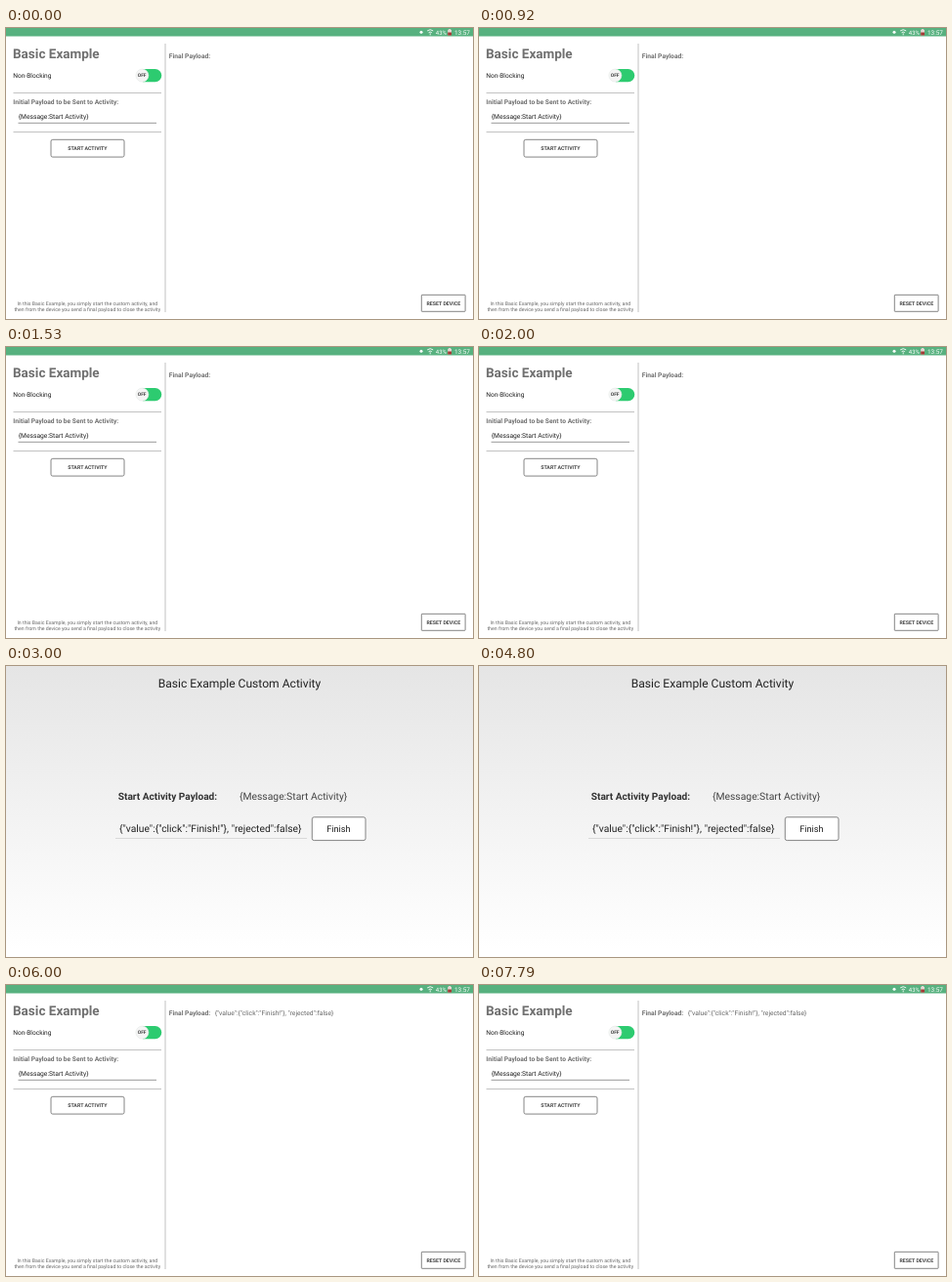
Write an HTML page that moves like this. It is 478x298 px and loops after 8.99 s.

```html
<!DOCTYPE html>
<html lang="en">
<head>
<meta charset="utf-8">
<title>Basic Example</title>
<style>
  html, body { margin: 0; width: 100%; height: 100%; overflow: hidden; background: #fff; }
  svg { display: block; width: 100vw; height: 100vh; }
  text { font-family: Roboto, sans-serif; font-size: 6.72px; fill: #222; white-space: pre; text-rendering: geometricPrecision; }
  .bold { font-weight: 700; fill: #707070; }
  .button { font-weight: 700; font-size: 5.25px; fill: #444; text-anchor: middle; }
  .hint { font-size: 5.2px; fill: #666; text-anchor: middle; }
  .box { fill: #fff; stroke: #666; stroke-width: .8; }
  .rule { stroke: #c2c2c2; fill: none; }
  .status text { fill: #fff; font-size: 6.4px; }
</style>
</head>
<body>
<svg viewBox="0 0 478 298">
  <defs>
    <linearGradient id="fade" x2="0" y2="1">
      <stop stop-color="#e5e5e5"/>
      <stop offset="1" stop-color="#fff"/>
    </linearGradient>
    <clipPath id="page"><path d="M0 0H478V291H0Z"/></clipPath>
  </defs>

  <g id="home" clip-path="url(#page)">
    <g class="status">
      <path d="M0 0H478V8.5H0Z" fill="#57b17f"/>
      <circle cx="425" cy="4.3" r="1.5" fill="#fff"/>
      <path d="M431.2 2.9Q434.2 .5 437.2 2.9M432.6 4.7Q434.2 3.4 435.8 4.7M434.2 5.4V7.3" fill="none" stroke="#fff" stroke-width=".9"/>
      <text x="439.8" y="6.5" style="font-size:6px">43%</text>
      <path d="M452.2 1.8H453.2V1H455V1.8H456V7.6H452.2Z" fill="#e4d8d4"/>
      <path d="M452.2 4.5H456V7.6H452.2Z" fill="#a33a35"/>
      <text x="459" y="7">13:57</text>
    </g>

    <text class="bold" x="7" y="31.3" style="font-size:13.5px">Basic Example</text>
    <text x="7.3" y="51.3" style="font-size:6.6px">Non-Blocking</text>
    <path d="M140 42H152.7A6.6 6.6 0 0 1 152.7 55.2H140Z" fill="#2dcb70"/>
    <circle cx="139.4" cy="48.6" r="6.5" fill="#f5f5f5" stroke="#e4e9e6" stroke-width=".6"/>
    <text class="button" x="139.2" y="50.3" style="font-size:4.9px">OFF</text>

    <path class="rule" d="M7.5 66.5H159M7.5 106.5H159"/>
    <path class="rule" d="M163 16V291"/>
    <text class="bold" x="7.3" y="78" style="font-size:6.65px">Initial Payload to be Sent to Activity:</text>
    <text x="12.8" y="92.5">{Message:Start Activity}</text>
    <path class="rule" d="M12.5 97.3H154" style="stroke:#999"/>
    <rect class="box" x="46" y="114.3" width="75" height="17.8" rx="1.8"/>
    <text class="button" x="83.4" y="125.1">START ACTIVITY</text>

    <text class="hint" x="83.3" y="283.8">In this Basic Example, you simply start the custom activity, and</text>
    <text class="hint" x="83.3" y="290">then from the device you send a final payload to close the activity</text>

    <text class="bold" x="166.8" y="31.3">Final Payload:</text>
    <text id="result" x="213.7" y="31.3" style="fill:#666">{"value":{"click":"Finish!"}, "rejected":false}</text>
    <rect class="box" x="425.3" y="273.3" width="44.8" height="17" rx=".5"/>
    <text class="button" x="447.8" y="283.8">RESET DEVICE</text>
  </g>

  <g id="activity">
    <path d="M0 0H478V291H0Z" fill="url(#fade)"/>
    <text x="239" y="22.4" text-anchor="middle" style="font-size:12.1px">Basic Example Custom Activity</text>
    <text x="114.8" y="136.9" style="font-size:10.15px;font-weight:700;fill:#333">Start Activity Payload:</text>
    <text x="239" y="136.9" style="font-size:10.35px;fill:#444">{Message:Start Activity}</text>
    <text x="116" y="170.4" style="font-size:10.3px">{"value":{"click":"Finish!"}, "rejected":false}</text>
    <path class="rule" d="M112 176.5H308" style="stroke:#d8d8d8"/>
    <rect class="box" x="313.3" y="154.8" width="54.7" height="23.8" rx="2"/>
    <text x="340.4" y="170.1" text-anchor="middle" style="font-size:9.2px">Finish</text>
  </g>
</svg>
<script>
  const LOOP = 8990, OPEN = 3000, CLOSE = 6000;
  const show = (id, on) => {
    document.getElementById(id).style.display = on ? '' : 'none';
  };
  const start = performance.now();

  function draw() {
    const t = Math.max(0, performance.now() - start) % LOOP;
    const inActivity = t >= OPEN && t < CLOSE;
    show('home', !inActivity);
    show('activity', inActivity);
    show('result', t >= CLOSE);
    requestAnimationFrame(draw);
  }
  draw();
</script>
</body>
</html>
```
